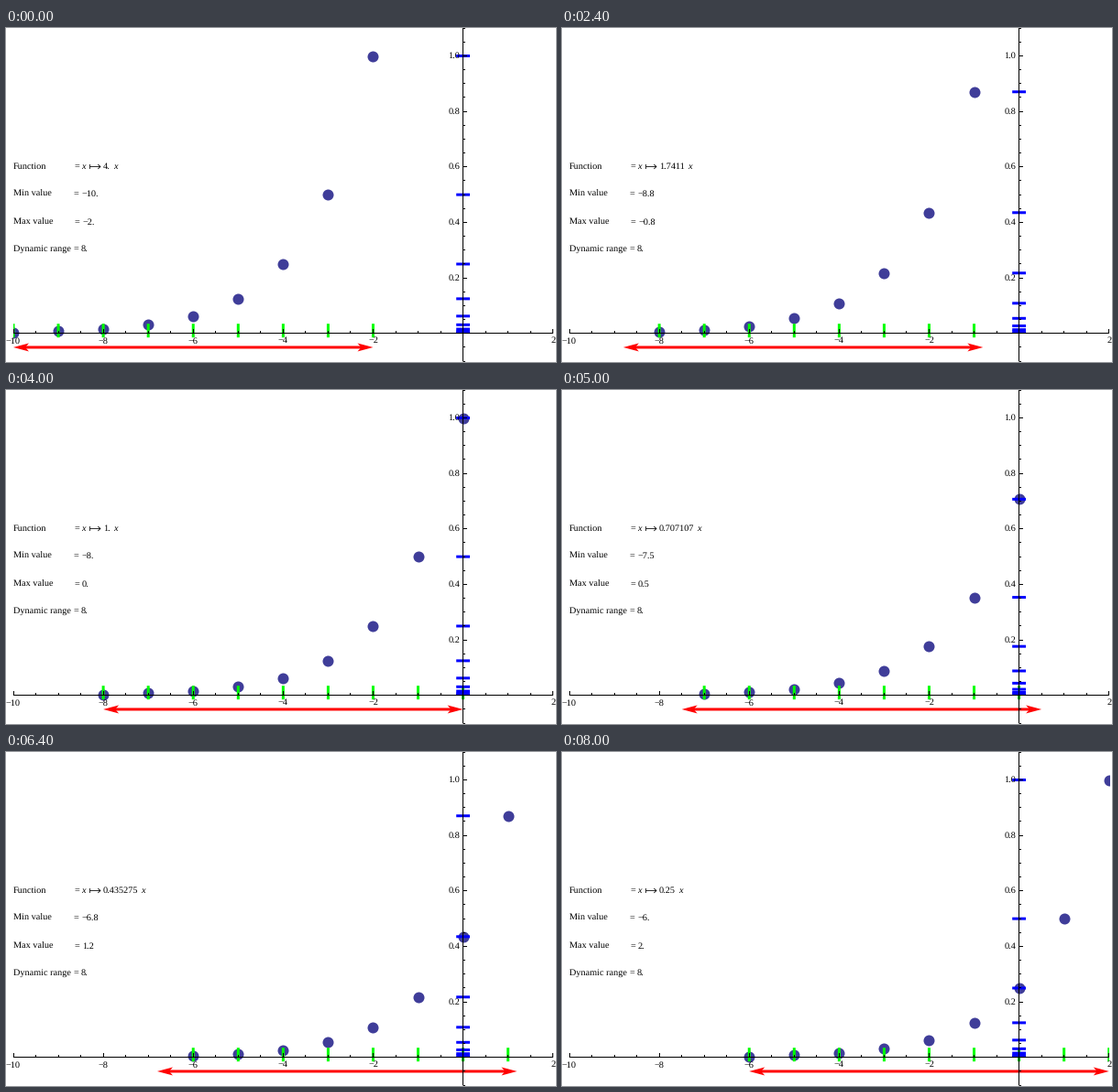
Animation, 600 px wide and 365 px high, one loop 8.1 s. Source, as a matplotlib script:

```python
import math

import matplotlib.pyplot as plt
import numpy as np
from matplotlib.animation import FuncAnimation
from matplotlib.collections import LineCollection
from matplotlib.patches import Polygon, Rectangle

WIDTH, HEIGHT, DPI = 600, 365, 100
FRAMES, INTERVAL = 81, 100
PX = 72 / DPI
FONT_PX = 10.2
SPAN = 8
ARROW_LEVEL = -0.05
MINUS = "\u2212"
ROWS = (154, 184, 215, 244)

plt.rcParams.update({
    "font.family": "Liberation Serif",
    "font.size": FONT_PX * PX,
    "text.hinting": "no_hinting",
})

fig = plt.figure(figsize=(WIDTH / DPI, HEIGHT / DPI), dpi=DPI, facecolor="white")
ax = fig.add_axes([0, 0, 1, 1])
ax.set(xlim=(0, WIDTH), ylim=(HEIGHT, 0))
ax.axis("off")


def to_x(value):
    return 498.6 + 49.06 * value


def to_y(value):
    return 333.8 - 303.3 * value


def pixel(position):
    """Centre of the pixel that holds a position."""
    return math.floor(position) + 0.5


def label(x, y, text="", **style):
    return ax.text(x, y, text, va="baseline", zorder=6, **style)


def line(xs, ys, width=1.0):
    ax.plot(xs, ys, color="black", lw=width * PX, solid_capstyle="butt",
            snap=False, zorder=5)


def decimal(value):
    text = f"{value:.6g}".replace("-", MINUS)
    return text if "." in text else text + "."


def draw_axes():
    x0, y0 = pixel(to_x(0)), pixel(to_y(0))
    line([8, 597], [y0, y0])
    line([x0, x0], [0, 364])
    for k in range(-20, 5):
        x, major = pixel(to_x(k / 2)), k % 4 == 0
        line([x, x], [y0, y0 - (4.5 if major else 2.5)])
        if major and k:
            label(to_x(k / 2), 344.5, str(k // 2).replace("-", MINUS), ha="center")
    for k in range(-2, 23):
        y, major = pixel(to_y(k / 20)), k % 4 == 0
        line([x0, x0 + (4.5 if major else 2.5)], [y, y])
        if major and k > 0:
            label(495, to_y(k / 20) + 2.35, f"{k / 20:.1f}", ha="right")


def draw_captions():
    names = ("Function", "Min value", "Max value", "Dynamic range")
    for name, y, x in zip(names, ROWS, (74.5, 73, 74.5, 73)):
        label(8, y, name)
        label(x, y, "=")
    label(82.4, ROWS[0], "x", style="italic")
    # maps-to arrow
    y = ROWS[0] - 2.5
    line([91.5, 91.5], [y - 2.5, y + 2.5], 0.8)
    line([91.5, 103], [y, y], 0.8)
    line([100.3, 103, 100.3], [y - 2.5, y, y + 2.5], 0.8)


def arrow_head(tip, direction):
    y = to_y(ARROW_LEVEL)
    back, notch = tip - 17 * direction, tip - 13 * direction
    return [(tip, y), (back, y - 4.5), (notch, y), (back, y + 4.5)]


def strokes(color, zorder):
    marks = LineCollection([], colors=color, linewidths=3 * PX, zorder=zorder)
    marks.set_snap(False)
    return ax.add_collection(marks, autolim=False)


draw_axes()
draw_captions()

frame_box = Rectangle((8, 0), 589, 364, transform=ax.transData)
dots = ax.scatter([], [], s=(12 * PX) ** 2, color=(0.247, 0.24, 0.6), lw=0, zorder=1)
dots.set_snap(False)
inputs = strokes("#00ff00", 2)
outputs = strokes("#0000ff", 3)
shaft = strokes("#ff0000", 4)
heads = [Polygon([(0, 0), (1, 0), (0, 1)], color="#ff0000", lw=0, zorder=4)
         for _ in range(2)]
for head in heads:
    ax.add_patch(head)
for artist in (dots, inputs):
    artist.set_clip_path(frame_box)

factor_text = label(106, ROWS[0])
variable_text = label(0, ROWS[0], "x", style="italic")
low_text = label(82, ROWS[1])
high_text = label(83, ROWS[2])
label(82, ROWS[3], decimal(SPAN))


def update(i):
    high = round(-2 + 0.05 * i, 2)
    low = round(high - SPAN, 2)
    n = np.arange(math.ceil(low), math.floor(high) + 1)
    xs, ys = to_x(n), to_y(2.0 ** (n - high))

    dots.set_offsets(np.column_stack([xs, ys]))
    inputs.set_segments([[(x, 323.2), (x, 338.2)] for x in xs])
    x0 = to_x(0)
    outputs.set_segments([[(x0 - 7.4, y), (x0 + 7.4, y)] for y in ys])

    left, right, y = to_x(low), to_x(high), to_y(ARROW_LEVEL)
    shaft.set_segments([[(left + 12, y), (right - 12, y)]])
    heads[0].set_xy(arrow_head(left, -1))
    heads[1].set_xy(arrow_head(right, 1))

    factor = decimal(2.0 ** -high)
    factor_text.set_text(factor)
    variable_text.set_x(107 + FONT_PX / 2 * len(factor))
    variable_text.set_x(variable_text.get_position()[0] - 0.5)
    low_text.set_text(decimal(low))
    high_text.set_text(decimal(high))
    return []


animation = FuncAnimation(fig, update, frames=FRAMES, interval=INTERVAL,
                          repeat=True, repeat_delay=0)
plt.show()
```
